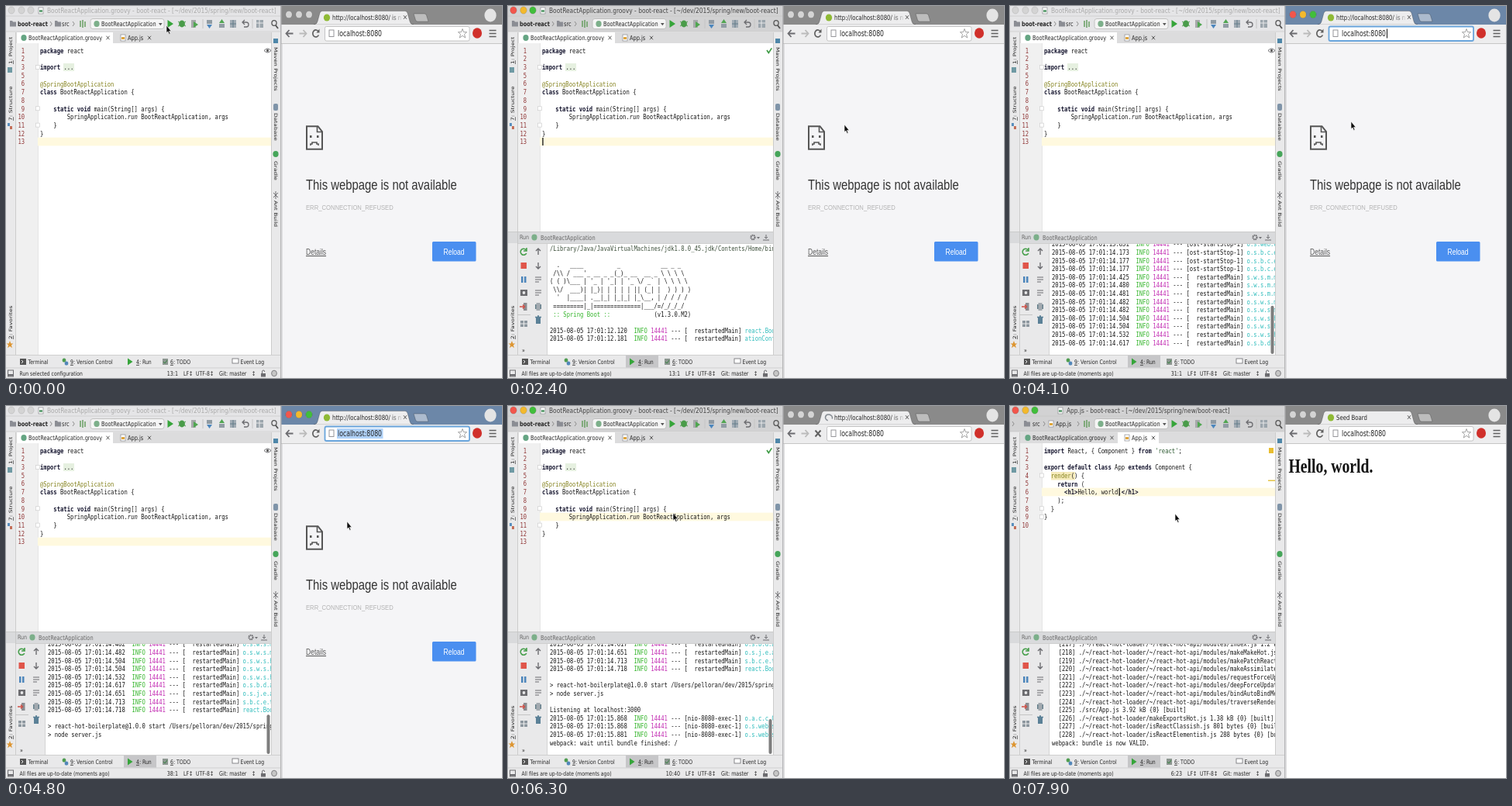
An HTML page that plays this animation: 640x480 px, repeating every 8000 ms.

```html
<!DOCTYPE html>
<html lang="en">
<head>
<meta charset="utf-8">
<title>Starting a web application</title>
<style>
  html, body { margin: 0; width: 100%; height: 100%; overflow: hidden; background: #ececec; }
  svg { display: block; width: 100vw; height: 100vh; }
  text { white-space: pre; }
  .k { font-weight: bold; fill: #15152e; }
  .i { font-style: italic; }
  .a { fill: #85831f; }
  .p { fill: #3c4f3a; }
  .g { fill: #35b52c; }
  .m { fill: #c431b4; }
  .c { fill: #2fbcbc; }
  .s { fill: #2d5a32; }
</style>
</head>
<body>
<svg id="stage" viewBox="0 0 640 480" preserveAspectRatio="none"></svg>
<script>
const LOOP = 8000;
const SQUEEZE = 0.79;
const ROW = 10.6;
const UI = "'DejaVu Sans', sans-serif";
const MONO = "'DejaVu Sans Mono', monospace";
const SANS = "'Liberation Sans', sans-serif";
const SERIF = "'Liberation Serif', serif";
const PANEL = '#e9e9ea', EDGE = '#c4c4c4', ICON = '#6c6c70', INK = '#262626';

const IDE_CLICK = 400, RUN_OPEN = 800, FILES_CHECKED = 1400, WEB_CLICK = 2600, SELECT_URL = 4500,
  REQUEST = 5250, PAGE_CLEARED = 5550, IDE_RETURN = 6050, PAGE_READY = 6800, OPEN_SCRIPT = 7400;

const rect = (x, y, w, h, fill, extra = '') =>
  `<rect x="${x}" y="${y}" width="${w}" height="${h}" fill="${fill}" ${extra}/>`;
const dot = (x, y, r, fill, extra = '') =>
  `<ellipse cx="${x}" cy="${y}" rx="${r * 0.9}" ry="${r}" fill="${fill}" ${extra}/>`;
const shape = (d, fill, extra = '') => `<path d="${d}" fill="${fill}" ${extra}/>`;
const line = (d, stroke = ICON, width = 1) =>
  `<path d="${d}" fill="none" stroke="${stroke}" stroke-width="${width}"/>`;
const group = (id, body, extra = '') => `<g id="${id}" ${extra}>${body}</g>`;

// y is the middle of the line
function text(x, y, body, { size = 8.36, fill = INK, font = UI, rot = 0, extra = '' } = {}) {
  return `<text transform="translate(${x} ${y}) scale(${SQUEEZE} 1) rotate(${rot})" y="${size * 0.36}"
    font-size="${size}" font-family="${font}" fill="${fill}" ${extra}>${body}</text>`;
}
const mono = (x, y, body, fill = '#161616') => text(x, y, body, { size: 9.13, font: MONO, fill });
const tag = cls => body => `<tspan class="${cls}">${body}</tspan>`;
const [k, i, a, p, g, m, c, s] = [...'kiapgmcs'].map(tag);
const cross = (x, y) => line(`M${x - 2} ${y - 2.3}l4 4.6m0 -4.6l-4 4.6`, '#555');
const chevron = (x, y) => line(`M${x - 1} ${y - 3}l2.2 3l-2.2 3`, '#8c8c8c');
const folder = (x, y) => shape(`M${x - 4} ${y - 4}h3l1 1.5h4v6h-8z`, '#8b8d94');
const page = (x, y, fill) => rect(x - 3, y - 4, 6, 8, '#fff', 'stroke="#8c8c90" stroke-width=".7"')
  + rect(x - 2, y - 1, 4, 3, fill);
const lights = (id, xs, y, colors) =>
  group(id, xs.map((x, n) => dot(x, y, 4.6, colors[n], 'stroke="#00000030" stroke-width=".5"')).join(''));
const LIT = ['#f2564c', '#f3b92d', '#41be3b'];
const GREY = Array(3).fill('#d4d4d4');

function ideFrame() {
  const runMark = (x, y) => shape(`M${x - 3.5} ${y - 5}l7.5 5l-7.5 5z`, '#36a53a');
  return rect(0, 0, 355, 480, PANEL)
    + group('ideBar', rect(0, 0, 355, 33, '#d2d2d3'))
    + lights('ideGrey', [7, 20, 32], 5.5, GREY) + lights('ideLit', [7, 20, 32], 5.5, LIT)
    + group('titleText', '') + line('M0 13H355M0 33H355', EDGE, 0.6)
    + group('crumbsMain', folder(9, 23) + text(15, 23, 'boot-react', { extra: 'font-weight="bold"' })
      + chevron(58, 23) + folder(67, 23) + text(72, 23, 'src') + chevron(87, 23))
    + group('crumbsApp', chevron(4, 23) + folder(22, 23) + text(29, 23, 'src') + chevron(44, 23)
      + page(53, 23, '#e0a83c') + text(59, 23, 'App.js') + chevron(88, 23))
    + line('M96 19v8M99 18v10M102 20v7', '#5f9a58', 1.4)
    + rect(109, 16.5, 95, 13, '#f5f5f5', 'rx="3" stroke="#b8b8b8" stroke-width=".8"')
    + dot(117, 23, 4, '#7caf8a') + text(123, 23, 'BootReactApplication')
    + shape('M197 22h4.6l-2.3 3.3z', '#555')
    + runMark(212, 23) + dot(227, 23, 4.4, '#4a9c4a') + line('M222 20l10 6m0-6l-10 6', '#4a9c4a')
    + rect(239, 18, 6, 10, '#a6a8aa') + shape('M242 20l6 4l-6 4z', '#4fa650')
    + line('M254 17v12', EDGE)
    + rect(259, 18, 7, 5, '#919ca4') + shape('M259 24h7l-3.5 5z', '#4b86bd')
    + rect(275, 23, 7, 5, '#919ca4') + shape('M275 22h7l-3.5-5z', '#50a552')
    + rect(289, 18, 8, 10, '#a2acb5') + line('M289 23h8M293 18v10', '#657d8a')
    + line('M306 21h4a3 3 0 0 1 0 6h-3M308 18l-3 3l3 3', ICON, 1.3)
    + line('M318 17v12', EDGE)
    + rect(323, 18, 9, 10, '#9ba5ac') + line('M323 22h9M327 18v10', '#e8e8ea')
    + line('M348 25l3 4', '#555', 1.8) + dot(346, 22, 3.4, 'none', 'stroke="#555" stroke-width="1.3"');
}

function sideBars() {
  const left = (y, num, label) =>
    text(6, y, `<tspan text-decoration="underline">${num}</tspan>: ${label}`, { size: 7.5, rot: -90 });
  const right = (y, label) => text(348, y, label, { size: 7.5, rot: 90 });
  return line('M12.5 34V450M342.5 34V450', EDGE, 0.8)
    + left(75, 1, 'Project') + rect(2, 79, 6, 7, '#6f9aa4')
    + left(148, 7, 'Structure') + rect(2, 151, 3, 4, '#5a8fbd') + rect(5, 155, 3, 4, '#c46f59')
    + left(430, 2, 'Favorites') + shape('M5 432l1.3 3.4h3l-2.4 2.2l1 3.6l-2.9-2.1l-2.9 2.1l1-3.6l-2.4-2.2h3z', '#dd9531')
    + rect(345, 42, 6, 6, '#4d86a8') + right(53, 'Maven Projects')
    + rect(345, 126, 6, 9, '#7f94a8', 'rx="2"') + right(138, 'Database')
    + dot(348, 191, 4, '#46a55a') + right(200, 'Gradle')
    + line('M345 241l6 6m0-6l-6 6M348 239v10') + right(251, 'Ant Build');
}

const GROOVY = [
  [1, `${k('package')} react`], [2, ''], [3, `${k('import')} ...`], [5, ''],
  [6, a('@SpringBootApplication')], [7, `${k('class')} BootReactApplication {`], [8, ''],
  [9, `    ${k('static void')} main(String[] args) {`],
  [10, `        SpringApplication.${i('run')} BootReactApplication, args`],
  [11, '    }'], [12, '}'], [13, '']
];
const SCRIPT = [
  `${k('import')} React, { Component } ${k('from')} ${s("'react'")};`, '',
  `${k('export default class')} App ${k('extends')} Component {`,
  `  ${a('render')}() {`, `    ${k('return')} (`,
  `      ${k('&lt;h1&gt;')}Hello, world.${k('&lt;/h1&gt;')}`,
  '    );', '  }', '}', ''
].map((body, n) => [n + 1, body]);

const editorY = row => 57.5 + row * 10.68;

function codeRows(rows, folds) {
  const marks = folds.map(n => rect(38.5, editorY(n) - 2.5, 5, 5, '#fff', 'stroke="#cfcfcf" stroke-width=".7"'));
  return marks.join('') + rows.map(([num, body], n) =>
    text(24, editorY(n), num, { size: 9, font: MONO, fill: '#8f3434', extra: 'text-anchor="end"' })
    + mono(44, editorY(n), body)).join('');
}

function editor() {
  return rect(13, 34, 329, 14, '#dcdcdd') + rect(0, 0, 0, 14, '#fff', 'id="activeTab"')
    + dot(23, 41, 4, '#65a583') + text(29, 41, 'BootReactApplication.groovy') + cross(131.5, 41)
    + page(151, 41, '#dfa53c') + text(157, 41, 'App.js') + cross(185, 41)
    + rect(13, 48, 28, 402, '#f0f0f0') + rect(41, 48, 301, 402, '#fff')
    + line('M41.5 48V450', '#d4d4d4', 0.6)
    + rect(41, 0, 301, 10.7, '#fff9df', 'id="caretRow"')
    + group('groovy', rect(74, 74, 14, 10, '#e6f0e0') + codeRows(GROOVY, [2, 7, 9]))
    + group('script', rect(53, 85, 31, 10.5, '#f6ebbc') + codeRows(SCRIPT, [3, 7, 8])
      + rect(334, 54, 6, 7, '#e8bd30') + rect(333, 95.5, 9, 1.5, '#e4c446'))
    + group('eye', shape('M333 57.5q4.5-5 9 0q-4.5 5-9 0', '#fff', `stroke="${ICON}"`) + dot(337.5, 57.5, 1.7, '#555'))
    + group('check', line('M334 57l2.3 3.4l4-6', '#3f9c46', 1.7))
    + rect(0, 0, 1.3, 10, '#111', 'id="editCaret"');
}

function runPanel() {
  const arrow = (y, up) => line(`M39 ${y - 4}v8M36 ${y + (up ? -1 : 1)}l3 ${up ? -3 : 3}l3 ${up ? 3 : -3}`, ICON, 1.4);
  const lines = y => line(`M35 ${y - 3}h8M35 ${y}h8M35 ${y + 3}h5`, ICON, 1.2);
  return rect(13, 291, 329, 159, PANEL) + rect(0, 291, 342, 15, '#d9dadc')
    + line('M0 291.5H342M12 306.5H342', EDGE, 0.7)
    + text(15, 298.5, 'Run', { size: 8, fill: '#666' }) + dot(34, 298.5, 4, '#7caf8a')
    + text(42, 298.5, 'BootReactApplication', { fill: '#666' })
    + dot(316, 298.5, 2.8, 'none', `stroke="${ICON}" stroke-width="2" stroke-dasharray="1.5 .7"`)
    + shape('M321 298h4l-2 2.5z', ICON) + line('M333 295v5m-2-2l2 2l2-2M329 302h8')
    + line('M23.5 315a4 4 0 1 0 .3 4M24 312v4h-4', '#479f4c', 1.6)
    + rect(16.5, 331, 7.5, 8, '#e0554a') + rect(17, 349, 2.5, 8, '#4d86bb') + rect(21, 349, 2.5, 8, '#4d86bb')
    + rect(16, 366, 9, 8, ICON) + dot(20.5, 370, 2, PANEL)
    + rect(20, 383, 4.5, 10, '#8c8c90') + line('M15 388h6m-2-2.5l2.5 2.5l-2.5 2.5', '#ce5047', 1.4)
    + rect(16, 406, 9, 8, '#8d979f') + line('M16 410h9M20.5 406v8', '#eee')
    + line('M12 398.5H29', EDGE) + text(18, 444, '»', { size: 8 })
    + arrow(317, true) + arrow(335, false) + lines(353) + lines(370)
    + rect(35, 385, 8, 6, '#66808c') + rect(36.5, 383, 5, 10, '#a3aab0')
    + rect(36, 402, 6, 8, '#5b8197') + line('M35 401.5h8M38 400h2', '#5b8197', 1.4)
    + rect(50.5, 307, 291.5, 143, '#fff') + line('M50.5 307V450', EDGE, 0.7)
    + group('log', '', 'clip-path="url(#logClip)"')
    + rect(336.5, 0, 4, 0, '#7d7d7d', 'rx="2" id="thumb"');
}

function bottomBars() {
  const label = (x, num, body) =>
    text(x, 459, (num ? `<tspan text-decoration="underline">${num}</tspan>: ` : '') + body, { size: 7.8 });
  return rect(0, 450, 355, 30, PANEL) + line('M0 450.5H355M0 467H355', EDGE, 0.7)
    + rect(152, 451, 42, 15.5, '#c6c6c8', 'id="runTab"')
    + rect(18, 455, 8, 8, '#555') + line('M20 457l2 2l-2 2', '#eee') + label(28.5, 0, 'Terminal')
    + dot(75, 457, 2.6, '#4f9c50') + dot(78, 461, 2.6, '#5387b9') + label(83, 9, 'Version Control')
    + shape('M157 454.5l6.5 4.5l-6.5 4.5z', '#36a53a') + label(168, 4, 'Run')
    + rect(202, 455, 7, 8, '#8c9690') + line('M203 459l2 2l3-4', '#3a8444') + label(212, 6, 'TODO')
    + rect(292, 455, 8, 6, '#fff', `stroke="${ICON}" stroke-width=".8"`) + label(302.5, 0, 'Event Log')
    + rect(2.5, 470, 7, 8, 'none', `stroke="${ICON}"`) + rect(3, 475, 6, 2.5, ICON)
    + group('statusText', '') + group('position', '')
    + text(229, 474, 'LF↕', { size: 7.8 }) + text(245, 474, 'UTF-8↕', { size: 7.8 })
    + text(275, 474, 'Git: master', { size: 8 }) + text(317, 474, '↕', { size: 7.8 })
    + rect(329, 474, 6, 4.5, ICON) + line('M330.5 474v-2a1.6 2 0 0 1 3.2 0')
    + dot(346, 474, 3.8, '#c6c6c6', `stroke="${ICON}" stroke-width=".8"`);
}

function browser() {
  const big = { font: SANS, size: 18.8, fill: '#333' };
  const tabEdge = 'stroke="#00000050" stroke-width=".7"';
  return rect(355, 0, 285, 480, '#f5f5f7')
    + rect(355, 0, 285, 24, '', 'id="strip"')
    + lights('webGrey', [365, 378, 391], 11, GREY) + lights('webLit', [365, 378, 391], 11, LIT)
    + shape('M526 10h14q2 0 2.5 2l2.5 8h-14q-2 0-2.5-2z', '#ffffff70', tabEdge)
    + shape('M397 24q4 0 5-4l3-11q1-2.5 3-2.5h107q2 0 3 2.5l3 11q1 4 5 4z', '#ededee', tabEdge)
    + group('leaf', dot(414, 15, 4.6, '#8fba35')) + group('spinner', line('M4 0a4 4.5 0 1 1-4-4.5', '#858b92', 1.6))
    + group('webTitle', '') + cross(515, 14.5)
    + dot(625, 12, 8.5, '#e4e4e4')
    + rect(355, 24, 285, 25, '#ededee') + line('M355 48.5H640', '#bdbdbd', 0.8)
    + line('M370.5 35.5h-9m4-4.5l-4 4.5l4 4.5', ICON, 1.8)
    + line('M378.5 35.5h9m-4-4.5l4 4.5l-4 4.5', '#bbb', 1.8)
    + group('reload', line('M403.2 33a4 4.5 0 1 0 .2 4.5', '#606060', 1.7) + shape('M404.5 29.5v5h-4z', '#606060'))
    + group('stop', line('M396.5 31.5l7 8m0-8l-7 8', '#606060', 1.9))
    + rect(411.5, 26.5, 186.5, 18.5, '#fff', 'rx="2" id="address"')
    + rect(427, 29, 59.5, 13, '#b0d2f8', 'id="selection"')
    + rect(417, 31, 6, 8.5, '#fff', 'stroke="#8c8c90" stroke-width=".9"')
    + text(428, 35.5, 'localhost:8080', { size: 9.8, fill: '#222' })
    + rect(486, 29.5, 1, 12, '#111', 'id="webCaret"')
    + shape('M589 29.5l1.6 4.2h4l-3.1 2.8l1.2 4.5l-3.7-2.7l-3.7 2.7l1.2-4.5l-3.1-2.8h4z', '#fff', 'stroke="#999" stroke-width=".9"')
    + dot(608, 35, 6.7, '#d0302b')
    + line('M623.5 31.5h9M623.5 35.5h9M623.5 39.5h9', '#606060', 1.7)
    + group('errorPage', line('M388 155.2H402.5L408 162V184.8H388Z', '#555', 2)
      + line('M401.5 155v7.5H408', '#555', 1.6)
      + rect(392, 167, 2.5, 3, '#555') + rect(401, 167, 2.5, 3, '#555')
      + line('M393 180v-2h2v-2h6v2h2v2', '#555', 1.6)
      + text(387, 230, 'This webpage is not available', big)
      + text(387, 259, 'ERR_CONNECTION_REFUSED', { font: SANS, size: 9.7, fill: '#b4b4b4' })
      + text(387, 317, 'Details', { font: SANS, size: 10.8, fill: '#5c5c5c', extra: 'text-decoration="underline"' })
      + rect(550, 304, 56.5, 25.5, '#4a8ff0', 'rx="1.5"')
      + text(564.5, 317, 'Reload', { font: SANS, size: 10.8, fill: '#fff' }))
    + group('blankPage', rect(355, 49, 285, 431, '#fff'))
    + group('helloPage', text(359.5, 77, 'Hello, world.', { font: SERIF, size: 24.96, fill: '#111', extra: 'font-weight="bold"' }))
    + rect(354, 0, 1.5, 480, '#b4b4b6') + rect(355.5, 49, 1.5, 431, '#dcdcde');
}

// Console output: each entry is { at: ms, body }
const output = [];
const print = (at, ...bodies) => bodies.forEach(body => output.push({ at, body }));
function logEntry(sec, thread, source) {
  const date = `2015-08-05 17:01:${sec.toFixed(3)}`;
  print(2450 + (sec - 12.911) * 955,
    `${date}  ${g('INFO')} ${m('14441')} --- [${thread.padStart(15)}] ${c(source)}`);
}

function fillOutput() {
  print(RUN_OPEN, p('/Library/Java/JavaVirtualMachines/jdk1.8.0_45.jdk/Contents/Home/bin/java'), '');
  print(1450,
    "  .   ____          _            __ _ _",
    " /\\\\ / ___'_ __ _ _(_)_ __  __ _ \\ \\ \\ \\",
    "( ( )\\___ | '_ | '_| | '_ \\/ _` | \\ \\ \\ \\",
    " \\\\/  ___)| |_)| | | | | || (_| |  ) ) ) )",
    "  '  |____| .__|_| |_|_| |_\\__, | / / / /",
    " =========|_|==============|___/=/_/_/_/",
    `${g(' :: Spring Boot ::')}             (v1.3.0.M2)`, '');
  const main = 'restartedMain', pool = 'ost-startStop-1', web = 'nio-8080-exec-1';
  [[12.120, main, 'react.BootReactApplication'], [12.181, main, 'ationConfigEmbeddedWeb'],
   [12.911, main, 'o.s.b.f.s.DefaultListable'], [13.411, main, 's.b.c.e.t.TomcatEmbedded'],
   [13.660, main, 'o.a.c.core.Standard'], [13.664, main, 'o.a.c.core.Standard'],
   [13.822, pool, 'o.a.c.c.C.[Tomcat]'], [13.831, pool, 'o.s.web.context.Loader'],
   [14.173, pool, 'o.s.b.c.e.Servlet'], [14.177, pool, 'o.s.b.c.e.Filter'], [14.177, pool, 'o.s.b.c.e.Filter'],
   [14.425, main, 's.w.s.m.m.a.Request'], [14.480, main, 's.w.s.m.m.a.Request'],
   [14.481, main, 's.w.s.m.m.a.Request'], [14.482, main, 'o.s.w.s.m.m.Mapping'],
   [14.482, main, 'o.s.w.s.m.m.Mapping'], [14.504, main, 'o.s.w.s.handler.Simple'],
   [14.504, main, 'o.s.w.s.handler.Simple'], [14.532, main, 'o.s.w.s.handler.Simple'],
   [14.617, main, 'o.s.b.d.a.OptionalLive'], [14.651, main, 'o.s.j.e.a.Annotation'],
   [14.713, main, 's.b.c.e.t.TomcatEmbedded'], [14.718, main, 'react.BootReactApplication']
  ].forEach(entry => logEntry(...entry));
  print(4500, '', '&gt; react-hot-boilerplate@1.0.0 start /Users/pelloran/dev/2015/spring/new',
    '&gt; node server.js', '');
  print(5200, 'Listening at localhost:3000');
  logEntry(15.868, web, 'o.a.c.c.C.[Tomcat]');
  logEntry(15.868, web, 'o.s.web.servlet.Dispatch');
  logEntry(15.881, web, 'o.s.web.servlet.Dispatch');
  print(PAGE_CLEARED, 'webpack: wait until bundle finished: /');
  const bundled = PAGE_READY - 50;
  for (let n = 0; n < 217; n++) print(bundled, `  [${n}] ./~/react/lib/module${n}.js 2.1 kB {0} [built]`);
  const hot = './~/react-hot-loader/';
  ['index', 'makeMakeHot', 'makePatchReactClass', 'makeAssimilatePrototype', 'requestForceUpdateAll',
   'deepForceUpdate', 'bindAutoBindMethods', 'traverseRenderedChildren'].forEach((name, n) =>
    print(bundled, `  [${217 + n}] ${hot}~/react-hot-api/modules/${name}.js 1.2 kB {0} [built]`));
  print(bundled, '  [225] ./src/App.js 3.92 kB {0} [built]',
    `  [226] ${hot}makeExportsHot.js 1.38 kB {0} [built]`,
    `  [227] ${hot}isReactClassish.js 801 bytes {0} [built]`,
    `  [228] ${hot}isReactElementish.js 288 bytes {0} [built]`,
    'webpack: bundle is now VALID.');
}

fillOutput();
document.getElementById('stage').innerHTML =
  '<defs><clipPath id="logClip"><path d="M51 307H342V450H51Z"/></clipPath>'
  + `<linearGradient id="fade" x1="0" x2="1"><stop offset=".84" stop-color="${INK}"/>`
  + `<stop offset="1" stop-color="${INK}" stop-opacity=".15"/></linearGradient></defs>`
  + ideFrame() + editor() + group('runPanel', runPanel()) + sideBars() + bottomBars() + browser()
  + group('pointer', shape('M0 0V9.6L2 7.9L3.6 11.4L5 10.7L3.5 7.4H6.2Z', '#0c0c0c', 'stroke="#fff" stroke-width=".6"'));

const el = {};
document.querySelectorAll('[id]').forEach(node => { el[node.id] = node; });
const show = (id, on) => el[id].setAttribute('display', on ? 'inline' : 'none');
const set = (id, attrs) => Object.entries(attrs).forEach(([name, value]) => el[id].setAttribute(name, value));
const shown = {};
function fill(id, html) {
  if (shown[id] !== html) el[id].innerHTML = shown[id] = html;
}

const PATH = [[0, 207, 25], [1300, 207, 25], [2300, 434, 153], [2450, 434, 153], [WEB_CLICK, 440, 149],
  [5500, 440, 149], [IDE_RETURN, 213, 138], [LOOP, 213, 139]];

function pointerAt(t) {
  const n = PATH.findIndex(point => point[0] > t);
  const [t0, x0, y0] = PATH[n - 1], [t1, x1, y1] = PATH[n];
  const u = (t - t0) / (t1 - t0), e = u * u * (3 - 2 * u);
  return `translate(${x0 + (x1 - x0) * e} ${y0 + (y1 - y0) * e})`;
}

function drawLog(count) {
  const offset = Math.max(0, ROW * count - 132.5);
  const first = Math.max(0, count - 14);
  fill('log', output.slice(first, count)
    .map(({ body }, n) => mono(54, 312.5 + ROW * (first + n) - offset, body)).join(''));
  const height = 143 * 13.5 / (count + 1);
  show('thumb', offset > 0 && count < 60);
  set('thumb', { y: 449 - height, height });
}

function render(t) {
  const webFocus = t >= WEB_CLICK && t < IDE_RETURN;
  const ideFocus = t >= IDE_CLICK && !webFocus;
  const running = t >= RUN_OPEN;
  const script = t >= OPEN_SCRIPT;
  const loading = t >= REQUEST && t < PAGE_READY;
  const loaded = t >= PAGE_READY;
  const selected = t >= SELECT_URL && t < REQUEST;
  const blink = t % 1100 < 550;
  const count = output.filter(entry => entry.at <= t).length;

  set('pointer', { transform: pointerAt(t) });
  set('ideBar', { opacity: ideFocus ? 1 : 0.15 });
  show('ideLit', ideFocus);
  show('webLit', webFocus);
  set('strip', { fill: webFocus ? '#6c87a8' : '#8a8a8a' });

  const titleX = script ? 73 : 53;
  fill('titleText', page(titleX - 8, 6, '#69a67c')
    + text(titleX, 6, `${script ? 'App.js' : 'BootReactApplication.groovy'} - boot-react - [~/dev/2015/spring/new/boot-react]`,
      { size: 9.45, fill: ideFocus ? '#444' : '#aaa' }));
  show('crumbsMain', !script);
  show('crumbsApp', script);
  show('groovy', !script);
  show('script', script);
  set('activeTab', script ? { x: 139, y: 34, width: 53 } : { x: 14, y: 34, width: 124 });

  const clicked = t >= IDE_RETURN;
  const row = script ? 5 : clicked ? 8 : 11;
  set('caretRow', { y: editorY(row) - 5.3 });
  set('editCaret', { x: script ? 140.5 : clicked ? 213 : 44.3, y: editorY(row) - 5 });
  show('editCaret', ideFocus && blink);
  const analysing = t < FILES_CHECKED || t >= 3600 && t < REQUEST;
  show('eye', analysing && !script);
  show('check', !analysing && !script);

  show('runPanel', running);
  show('runTab', running);
  drawLog(count);
  const status = t >= FILES_CHECKED ? 'All files are up-to-date (moments ago)' : 'Run selected configuration';
  fill('statusText', text(17.5, 474, status, { size: 7.7 }));
  const position = script ? '6:23' : clicked ? '10:40' : running ? `${count + 1}:1` : '13:1';
  fill('position', text(222, 474, position, { size: 8, extra: 'text-anchor="end"' }));

  show('leaf', !loading);
  show('spinner', loading);
  set('spinner', { transform: `translate(414 15) rotate(${t * 0.36})` });
  fill('webTitle', loaded ? text(421, 14.5, 'Seed Board', { size: 8.8 })
    : text(421, 14.5, 'http://localhost:8080/ is n', { size: 8.8, fill: 'url(#fade)' }));
  show('reload', !loading);
  show('stop', loading);
  const typing = webFocus && t < REQUEST;
  set('address', { stroke: typing ? '#6aa5dc' : '#b8b8b8', 'stroke-width': typing ? 1.8 : 0.8 });
  show('selection', selected);
  show('webCaret', typing && !selected && !blink);
  show('errorPage', t < PAGE_CLEARED);
  show('blankPage', t >= PAGE_CLEARED);
  show('helloPage', loaded);
}

const start = performance.now();
function tick() {
  render((performance.now() - start) % LOOP);
  requestAnimationFrame(tick);
}
tick();
</script>
</body>
</html>
```
